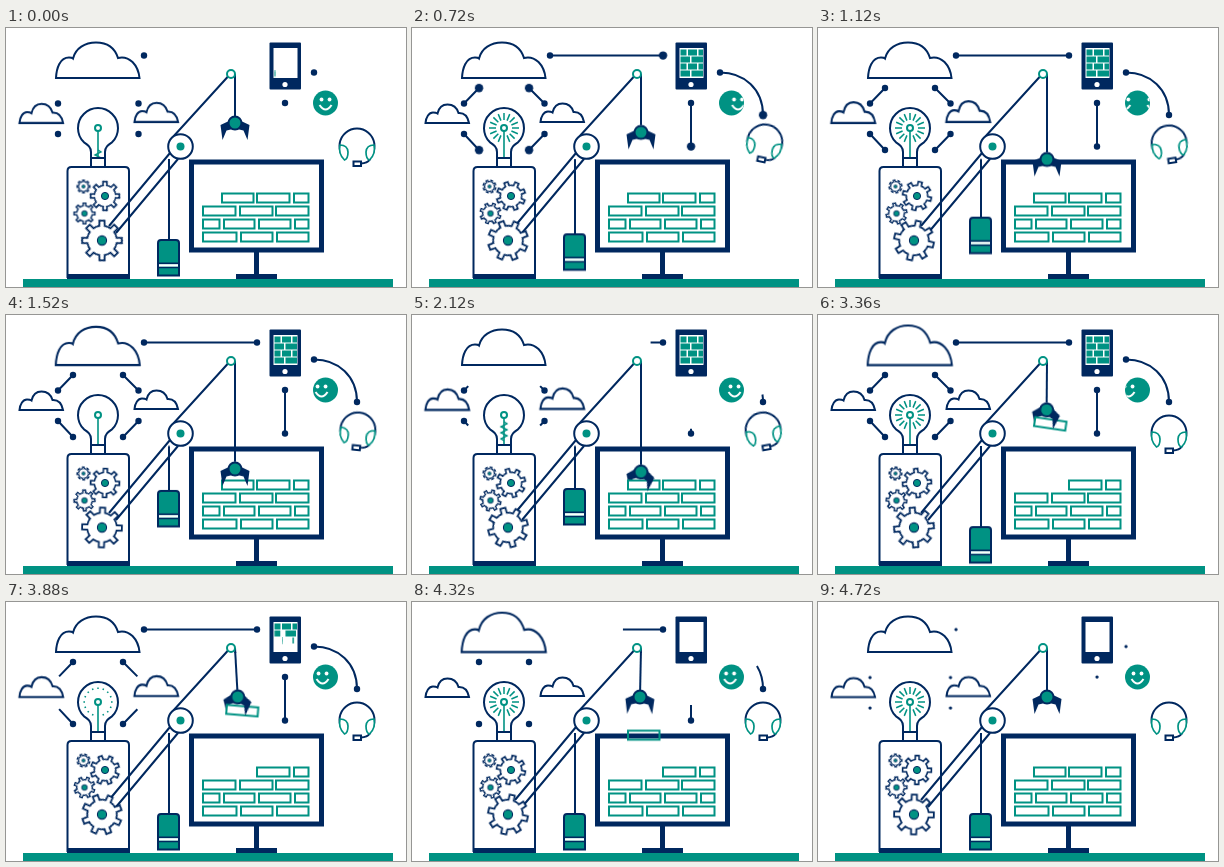
Write an HTML page that moves like this. It is 400 by 259 pixels and loops after 4760 ms.

```html
<!DOCTYPE html>
<html lang="en">
<head>
<meta charset="utf-8">
<title>Cloud build machine</title>
<style>
html, body { margin: 0; width: 100%; height: 100%; overflow: hidden; background: #fff; }
svg { display: block; width: 100%; height: 100%; --navy: #00285f; --green: #009283; }
[class] { animation: 4760ms linear infinite; }
.line { fill: none; stroke: var(--navy); stroke-width: 2; }
.white { fill: #fff; }
.green { stroke: var(--green); }
.navy { fill: var(--navy); }
.leaf { fill: var(--green); }

.cloud { animation-name: puff; animation-duration: 952ms; transform-box: fill-box; transform-origin: 50% 100%; }
.small { animation-delay: -300ms; }
@keyframes puff {
  0%, 24%, 74%, 100% { transform: none; }
  50% { transform: scale(1.01, 1.13); }
}

.hoist, .weight, .rope, .cord { animation-timing-function: cubic-bezier(.37, 0, .63, 1); }
.hoist { animation-name: hoist; }
.weight { animation-name: weight; }
.rope { animation-name: rope; transform-origin: 229px 50px; }
.cord { animation-name: cord; transform-origin: 163px 131px; }
@keyframes hoist {
  0%, 8%, 71%, 100% { transform: translateY(0); }
  36%, 56.7% { transform: translateY(62px); }
  68% { transform: translateY(-3px); }
}
@keyframes weight {
  0%, 8%, 71%, 100% { transform: translateY(0); }
  36%, 56.7% { transform: translateY(-38px); }
  68% { transform: translateY(1.8px); }
}
@keyframes rope {
  0%, 8%, 71%, 100% { transform: scaleY(1); }
  36%, 56.7% { transform: scaleY(2.632); }
  68% { transform: scaleY(.921); }
}
@keyframes cord {
  0%, 8%, 71%, 100% { transform: scaleY(1); }
  36%, 56.7% { transform: scaleY(.531); }
  68% { transform: scaleY(1.022); }
}

.swing { animation-name: swing; animation-timing-function: ease-in-out; transform-origin: 229px 46px; }
@keyframes swing {
  0%, 69%, 100% { transform: rotate(0); }
  74% { transform: rotate(2deg); }
  81.5% { transform: rotate(-3.2deg); }
  89% { transform: rotate(1.5deg); }
  95.5% { transform: rotate(-.5deg); }
}
.tilt { animation-name: tilt; transform-origin: 229px 95px; }
@keyframes tilt {
  0%, 37%, 90%, 100% { transform: rotate(0); }
  42%, 87% { transform: rotate(8deg); }
}
.left { animation-name: left; transform-origin: 224px 96px; }
.right { animation-name: right; transform-origin: 234px 96px; }
@keyframes left {
  0%, 36%, 90%, 100% { transform: rotate(0); }
  42%, 87% { transform: rotate(-12deg); }
}
@keyframes right {
  0%, 36%, 90%, 100% { transform: rotate(0); }
  42%, 87% { transform: rotate(12deg); }
}
.held { animation-name: held; transform-origin: 232px 108px; }
@keyframes held {
  0%, 37.99% { opacity: 0; transform: none; }
  38%, 56.7% { opacity: 1; transform: none; }
  60%, 87.39% { opacity: 1; transform: translate(1px, 1px) rotate(8deg); }
  87.4%, 100% { opacity: 0; transform: none; }
}
.drop { animation-name: drop; }
@keyframes drop {
  0%, 37.99% { opacity: 1; transform: none; }
  38%, 87.39% { opacity: 0; transform: translateY(-61px); }
  87.4% { opacity: 1; transform: translateY(-61px); animation-timing-function: ease-in; }
  93.3%, 100% { opacity: 1; transform: none; }
}

.turn { animation-name: turn; }
.back { animation-direction: reverse; }
@keyframes turn { to { transform: rotate(135deg); } }

.spark { animation-name: spark; }
@keyframes spark {
  0% { transform: translateY(-8px); }
  10% { transform: translateY(-47px); }
  10.1%, 41% { transform: translateY(0); }
  44.5% { transform: translateY(-23px); }
  49.5% { transform: translateY(-47px); }
  49.6%, 99.4% { transform: translateY(0); }
  100% { transform: translateY(-8px); }
}
.ray { animation-name: ray; stroke-width: 1.5; }
@keyframes ray {
  0%, 10.5%, 49.5%, 100% { stroke-dasharray: 0 0 0 99; }
  13%, 25%, 52%, 57%, 66%, 76%, 88%, 99.6% { stroke-dasharray: 0 0 7 99; }
  28%, 59.5%, 63%, 80%, 84% { stroke-dasharray: 0 5 1.6 99; }
  30% { stroke-dasharray: 0 7 0 99; }
}

.far { animation-name: far; }
@keyframes far {
  0%, 1.7%, 100% { stroke-dasharray: 0 0 0 300; }
  12.6%, 34.5%, 62.2%, 84% { stroke-dasharray: 0 0 100 300; }
  45.8%, 50.4%, 94.5% { stroke-dasharray: 0 100 0 300; }
}
.near { animation-name: near; }
@keyframes near {
  0%, 1.7%, 48.5%, 50.4%, 100% { stroke-dasharray: 0 0 0 300; }
  12.6%, 34.5%, 59%, 80.7% { stroke-dasharray: 0 0 100 300; }
  92% { stroke-dasharray: 0 100 0 300; }
}
.dot { transform-box: fill-box; transform-origin: center; fill: var(--navy); }
.far-start { animation-name: far-start; }
.far-end { animation-name: far-end; }
.near-start { animation-name: near-start; }
.near-end { animation-name: near-end; }
@keyframes far-start {
  0%, 34.5%, 65%, 84%, 100% { transform: scale(1); }
  36%, 61.5%, 85.5%, 98.3% { transform: scale(0); }
  63% { transform: scale(1.3); }
}
@keyframes far-end {
  0%, 12%, 96%, 100% { transform: scale(0); }
  14% { transform: scale(1.5); }
  17%, 94% { transform: scale(1); }
}
@keyframes near-start {
  0%, 80%, 100% { transform: scale(1); }
  81.4%, 98.3% { transform: scale(0); }
}
@keyframes near-end {
  0%, 12%, 36%, 58%, 94%, 100% { transform: scale(0); }
  14% { transform: scale(1.5); }
  17%, 34.5%, 62%, 92% { transform: scale(1); }
  59.5% { transform: scale(1.2); }
}

.tile { animation-name: tile; fill: var(--green); transform-box: fill-box; transform-origin: 0 50%; }
@keyframes tile {
  0%, 79.4%, 100% { transform: scaleX(0); }
  3.4%, 76% { transform: scaleX(1); }
}
.face { animation-name: face; }
@keyframes face {
  0% { transform: translateX(0); }
  15.1% { transform: translateX(6.5px); }
  31.9% { transform: translateX(25px); }
  44.5% { transform: translateX(32px); }
  60.5% { transform: translateX(43.5px); }
  81.5% { transform: translateX(55px); }
  99%, 100% { transform: translateX(58px); }
}
.headset { animation-name: shake; animation-timing-function: ease-in-out; transform-origin: 351px 117px; }
@keyframes shake {
  0%, 12.6%, 58%, 100% { transform: none; }
  15.1% { transform: translate(2px, -4px) rotate(12deg); }
  23% { transform: translate(0, -3px) rotate(-9deg); }
  31.9% { transform: translate(1px, -3px) rotate(6deg); }
  44.5% { transform: translate(0, -3px) rotate(-10deg); }
  52% { transform: translate(0, -1px) rotate(4deg); }
}
</style>
</head>
<body>
<svg viewBox="0 0 400 259" preserveAspectRatio="none">
  <defs>
    <clipPath id="stem"><rect x="86" y="103" width="12" height="26"/></clipPath>
    <clipPath id="ball"><circle cx="319.5" cy="75" r="12.3"/></clipPath>
    <path id="smallCloud" d="M13.5 95C14 89 17 84.5 21 84.5Q24 84.5 25.5 85.5C27 79 31 76.5 35.5 76.5C41 76.5 45 80 46.5 85Q55 84.5 57 95Z"/>
    <g id="smile">
      <circle cx="315.5" cy="71.5" r="1.9" fill="#fff"/>
      <circle cx="323.5" cy="71.5" r="1.9" fill="#fff"/>
      <path d="M313.5 77Q319.5 86 325.5 77" fill="none" stroke="#fff" stroke-width="2"/>
    </g>
  </defs>

  <rect class="leaf" x="17" y="251" width="370" height="8"/>

  <path class="line cloud" d="M50 50C50.5 40 54 29.5 63 29.5Q66 29.5 67 30.5C69.5 20 79 14.5 90 14.5C102 14.5 109 20.5 112 30Q120 28 126.5 34Q132.5 40 133.5 50Z"/>
  <g class="line cloud small"><use href="#smallCloud"/></g>
  <g class="line cloud small"><use href="#smallCloud" x="115" y="-1"/></g>
  <g id="links"></g>

  <!-- bulb -->
  <path class="line white" d="M85 130V124C85 119 82 117 78 114.3A20 20 0 1 1 106 114.3C102 117 99 119 99 124V130ZM85 130V139H99V130"/>
  <path class="line green" d="M92 103V129" style="stroke-width:1.6"/>
  <g clip-path="url(#stem)">
    <path class="line green spark" style="stroke-width:1.4" d="M92 130l3 2-6 3 6 3-6 3 6 3-6 3 3 2"/>
  </g>
  <circle class="line green" cx="92" cy="100" r="3"/>
  <g id="rays"></g>

  <!-- machine and crane -->
  <path class="line white" d="M61.5 250V143Q61.5 139 65.5 139H119Q123 139 123 143V250"/>
  <rect class="navy" x="61" y="246" width="63" height="5"/>
  <path class="line" d="M103 198L164 125M110 205L172 131M166 110L222 48.5"/>
  <g id="gears"></g>
  <path class="line cord" d="M163 131V212"/>
  <g class="weight">
    <path class="line" style="fill:var(--green)" d="M152 247.5V215Q152 212 155 212H170Q173 212 173 215V247.5Z"/>
    <path class="line" d="M152 235.3H173M152 239.5H173" style="stroke-width:1.4"/>
    <rect class="white" x="153" y="236.2" width="19" height="2.4"/>
  </g>
  <circle class="line white" cx="174.5" cy="118.5" r="12.3"/>
  <circle class="leaf" cx="174.5" cy="118.5" r="4"/>

  <!-- monitor -->
  <rect class="line white" x="185.5" y="134" width="130" height="88" style="stroke-width:5"/>
  <rect class="navy" x="248" y="224" width="5" height="23"/>
  <rect class="navy" x="230" y="246" width="41" height="5"/>
  <g id="wall"></g>

  <g class="swing">
    <path class="line" d="M229 46V51"/>
    <path class="line rope" d="M229 50V88"/>
    <g class="hoist">
      <g class="tilt">
        <path class="navy left" d="M224 92.5L214.5 97L216.5 112L220.5 102.5L227 101Z"/>
      </g>
      <rect class="line green white held" x="216" y="103.5" width="31.5" height="9"/>
      <g class="tilt">
        <path class="navy right" d="M234 92.5L243.5 97L241.5 112L237.5 102.5L231 101Z"/>
        <circle class="line" cx="229" cy="95" r="6.5" style="fill:var(--green)"/>
      </g>
    </g>
  </g>
  <circle class="line green white" cx="225" cy="46" r="4"/>

  <!-- phone -->
  <rect class="navy" x="263.5" y="14.5" width="31.5" height="47" rx="1"/>
  <rect class="white" x="267.5" y="20" width="24" height="30"/>
  <circle class="white" cx="279" cy="56.5" r="2.6"/>
  <g id="tiles"></g>

  <!-- smiley -->
  <circle class="leaf" cx="319.5" cy="75" r="12.5"/>
  <g clip-path="url(#ball)">
    <g class="face">
      <use href="#smile"/><use href="#smile" x="-29"/><use href="#smile" x="-58"/>
    </g>
  </g>

  <!-- headset -->
  <g class="headset">
    <path class="line" d="M336 127A17.5 17.5 0 1 1 366 127M364.5 131Q361 135.5 355 135.5"/>
    <path class="line green white" d="M334 117Q341.5 117 342 124Q342 131 338.5 132Q332 126 334 117ZM368 117Q360.5 117 360 124Q360 131 363.5 132Q370 126 368 117Z" style="stroke-width:1.7"/>
    <rect class="line white" x="347.5" y="133.5" width="7.5" height="4.5"/>
  </g>
</svg>
<script>
const $ = id => document.getElementById(id);

function add(parent, tag, attrs) {
  const el = document.createElementNS('http://www.w3.org/2000/svg', tag);
  for (const key in attrs) el.setAttribute(key, attrs[key]);
  return parent.appendChild(el);
}

function polar(r, a) {
  return (r * Math.cos(a)).toFixed(2) + ' ' + (r * Math.sin(a)).toFixed(2);
}

function gear(x, y, r, hub, width, dir) {
  const root = add($('gears'), 'g', { transform: `translate(${x} ${y})` });
  const body = r * 0.74;
  let d = '';
  for (let i = 0; i < 8; i++) {
    const a = i * Math.PI / 4;
    d += (i ? `A${body} ${body} 0 0 1 ` : 'M') + polar(body, a - 0.18);
    d += 'L' + polar(r, a - 0.13) + 'L' + polar(r, a + 0.13) + 'L' + polar(body, a + 0.18);
  }
  d += `A${body} ${body} 0 0 1 ${polar(body, -0.18)}Z`;
  add(root, 'path', { class: 'line white turn ' + dir, d, style: `stroke-width:${width}` });
  add(root, 'circle', { class: 'line', r: hub, style: `fill:var(--green);stroke-width:${width * 0.6}` });
}
gear(77.5, 158.5, 6.5, 1.6, 1.2, '');
gear(99, 168, 14.5, 3.6, 1.6, 'back');
gear(78.5, 185.5, 10.5, 2.8, 1.4, '');
gear(96, 212.5, 20, 4.6, 1.8, 'back');

for (let i = 0; i < 16; i++) {
  if (i === 4) continue; // the stem is here
  const a = i * Math.PI / 8;
  add($('rays'), 'path', {
    class: 'line green ray', transform: 'translate(92 100)',
    d: `M${polar(8, a)}L${polar(15, a)}`
  });
}

function link(kind, x1, y1, x2, y2, curve = 'L') {
  const g = $('links');
  add(g, 'path', { class: 'line ' + kind, pathLength: 100, d: `M${x1} ${y1}${curve}${x2} ${y2}` });
  add(g, 'circle', { class: `dot ${kind}-start`, cx: x1, cy: y1, r: 3.2 });
  add(g, 'circle', { class: `dot ${kind}-end`, cx: x2, cy: y2, r: 3.2 });
}
link('far', 138, 27.5, 251, 27.5);
link('far', 308, 44.5, 351, 87, 'C332 44.5 351 61 ');
link('far', 279, 75, 279, 118.5);
link('near', 52, 75.5, 67, 60);
link('near', 132.5, 75.5, 117, 60);
link('near', 52, 106, 67, 122);
link('near', 132.5, 106, 117, 122);

const wall = [
  [[216, 248], [251, 284], [288, 303]],
  [[197, 230], [234, 267], [270, 303]],
  [[197, 214], [218, 249], [253, 285], [289, 303]],
  [[197, 231], [235, 267], [271, 303]]
];
wall.forEach((row, j) => row.forEach(([a, b], i) => add($('wall'), 'rect', {
  class: 'line green' + (i + j ? '' : ' drop'),
  x: a, y: 165.5 + j * 13, width: b - a - 0.5, height: 9
})));

const rows = [[[268.5, 9.5], [279.5, 11.5]], [[268.5, 6], [276, 9], [286.5, 4.5]]];
let order = 0;
for (let j = 0; j < 4; j++) {
  for (const [x, width] of rows[j % 2]) {
    add($('tiles'), 'rect', {
      class: 'tile', x, y: 42.5 - j * 7, width, height: 6,
      style: `animation-delay:${45 * order++ - 4780}ms`
    });
  }
}
</script>
</body>
</html>
```
